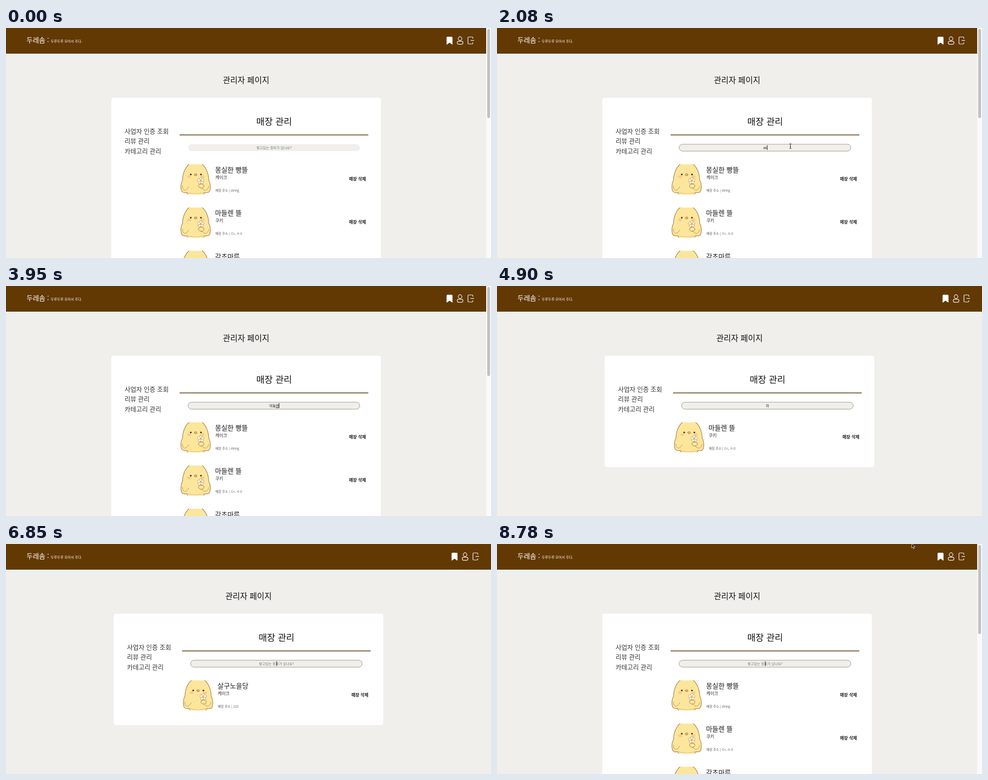
An HTML page that plays this animation: 1000 px wide and 475 px high, repeating every 8800 ms.

```html
<!DOCTYPE html>
<html lang="ko">
<head>
<meta charset="utf-8">
<title>관리자 페이지</title>
<style>
html, body { margin: 0; width: 100%; height: 100%; overflow: hidden; background: #f0efeb; }
svg { display: block; }
#stage { width: 100%; height: 100%; }
text { font-family: "Noto Sans CJK KR", "Noto Sans CJK", "Noto Sans", sans-serif; white-space: pre; }
</style>
</head>
<body>
<svg id="stage" viewBox="0 0 1000 475" xmlns="http://www.w3.org/2000/svg">
  <defs>
    <symbol id="chick" viewBox="0 0 62 62">
      <path d="M20-2C8 6 4 22 4 33C0 39 0 50 2 55C5 59 9 59 12 58L16 64H46L50 58C54 59 58 59 60 55C62 50 62 39 58 33C58 22 54 6 42-2Z" fill="#fce69c" stroke="#a0733f" stroke-width="1.1"/>
      <path d="M4 44C3 54 10 58 17 46M58 45C56 54 50 57 43 48" fill="none" stroke="#b5854a" stroke-width=".9"/>
      <path d="M13 58Q31 64 49 58" fill="none" stroke="#ecc978" stroke-width="1.5"/>
      <ellipse cx="17.5" cy="25.5" rx="4.4" ry="3" fill="#f9cd8c"/>
      <ellipse cx="45" cy="25.5" rx="4.4" ry="3" fill="#f9cd8c"/>
      <circle cx="21" cy="21" r="1.8" fill="#4a3425"/>
      <circle cx="42" cy="21" r="1.8" fill="#4a3425"/>
      <ellipse cx="31" cy="21.5" rx="2.9" ry="2.1" fill="#f4bd66" stroke="#8c6238" stroke-width=".8"/>
      <path d="M41 38L43 50" stroke="#8b8a4c" stroke-width="1.2"/>
      <g fill="#fffaf0" stroke="#b08346" stroke-width=".7" id="petals"></g>
      <circle cx="41.5" cy="34" r="2.2" fill="#f3b04a"/>
      <path d="M37 43Q43 38 48 43Q49 49 42 49Q36 48 37 43Z" fill="#fce69c" stroke="#a0733f" stroke-width=".9"/>
    </symbol>
  </defs>
  <rect width="1000" height="475" fill="#f0efeb"/>
  <rect width="1000" height="53" fill="#623903"/>
  <g id="brand"></g>
  <g id="icons" fill="none" stroke="#fff" stroke-width="1.2" stroke-linecap="round" stroke-linejoin="round">
    <path d="M909 20Q909 18.500 910.500 18.500H918.500Q920 18.500 920 20V33.500L914.500 29.500L909 33.500Z" fill="#fff"/>
    <circle cx="936.200" cy="22" r="3.800"/>
    <rect x="930.400" y="27.400" width="11.800" height="6.200" rx="3.100"/>
    <path d="M962.500 21.500V20Q962.500 18.500 961 18.500H954Q952.500 18.500 952.500 20V31.500Q952.500 33 954 33H961Q962.500 33 962.500 31.500V30M958.500 25.700H964.500"/>
  </g>
  <g id="page">
    <rect id="card" x="217" y="144" width="556" rx="5" fill="#fff"/>
    <g id="labels"></g>
    <rect x="358" y="219.800" width="389" height="2" fill="#7d5f3c"/>
    <rect id="box" x="375.500" y="240" width="354" height="14.300" rx="7.150" fill="#f0efec"/>
    <text id="field" x="552.700" y="249.500" font-size="7.100" text-anchor="middle"></text>
    <rect id="under" y="251.200" height=".8" fill="#333"/>
    <rect id="caret" y="242" width="1" height="10" fill="#111"/>
    <g id="all"></g>
    <g id="hit1"></g>
    <g id="hit2"></g>
  </g>
  <g id="bar">
    <rect x="990" width="10" height="475" fill="#fafafa"/>
    <rect x="992.200" y="2" width="5.800" height="184" rx="2.900" fill="#c1c1c1"/>
  </g>
  <path id="arrow" d="M0 0V9.200L2.200 7.300L3.700 10.500L5.200 9.800L3.800 6.800H6.600Z" fill="#111" stroke="#fff" stroke-width=".8"/>
  <path id="beam" d="M-2-5Q0-5 0-4Q0-5 2-5M0-4V4M-2 5Q0 5 0 4Q0 5 2 5M-1 1H1" fill="none" stroke="#222" stroke-width="1"/>
</svg>
<script>
const LOOP = 8800;
const $ = id => document.getElementById(id);
const show = (id, on) => $(id).setAttribute('visibility', on ? 'visible' : 'hidden');
const move = (id, x, y) => $(id).setAttribute('transform', `translate(${x} ${y})`);

// text placed by its left edge (or middle) and vertical centre
const label = (str, x, cy, size, weight = 400, fill = '#1c1c1c', anchor = 'start') =>
  `<text x="${x}" y="${cy + size * 0.38}" font-size="${size}" font-weight="${weight}" fill="${fill}" text-anchor="${anchor}">${str}</text>`;

const shop = (name, kind, address, row) => {
  const y = 281.5 + row * 89.3;
  return `<use href="#chick" x="360" y="${y}" width="62" height="62"/>` +
    label(name, 431, y + 11.3, 13.9, 500) +
    label(kind, 431.7, y + 27, 8.8, 500, '#2a2a2a') +
    label('매장 주소 | ' + address, 431.7, y + 53.8, 6.6, 400, '#555') +
    label('매장 삭제', 742.3, y + 30.3, 8.9, 700, '#222', 'end');
};

$('petals').innerHTML = [0, 1, 2, 3, 4].map(i => {
  const a = i * Math.PI * 0.4 - Math.PI / 2;
  return `<circle cx="${41.5 + 4 * Math.cos(a)}" cy="${34 + 4 * Math.sin(a)}" r="2.9"/>`;
}).join('');

$('brand').innerHTML =
  label('두레솜 :', 42.3, 25, 14, 400, '#fff') +
  label('두루두루 모아서 주다.', 92.3, 27.8, 7.1, 400, '#fff');

$('labels').innerHTML =
  label('관리자 페이지', 495, 108.2, 16.5, 500, '#111', 'middle') +
  label('매장 관리', 552.8, 193, 18.6, 400, '#111', 'middle') +
  ['사업자 인증 조회', '리뷰 관리', '카테고리 관리']
    .map((s, i) => label(s, 244.5, 213 + i * 20.3, 13, 500, '#333')).join('');

const cookie = ['마들렌 뜰', '쿠키', 'ㅁㄴㅇㄹ'];
$('all').innerHTML = shop('몽실한 빵뜰', '케이크', 'string', 0) +
  shop(...cookie, 1) + shop('감초마루', '케이크', 'string', 2);
$('hit1').innerHTML = shop(...cookie, 0);
$('hit2').innerHTML = shop('살구노을당', '케이크', '123', 0);

// [time, field value, last syllable still being composed]
const keys = [
  [0, ''], [1950, 'a'], [2080, 'ak'], [2580, 'a'], [2650, ''],
  [2790, 'ㅁ', 1], [2870, '마', 1], [3060, '맏', 1], [3130, '마드', 1], [3410, '마들', 1],
  [3690, '마들ㄹ', 1], [3890, '마들레', 1], [3950, '마들렌', 1],
  [4780, '마들'], [4900, '마'], [5050, ''],
  [5140, 'ㅅ', 1], [5410, '사', 1], [5480, '살', 1], [5560, '삵', 1], [5630, '살구', 1],
  [6740, '살'], [6850, '']
];
// caret on/off switches, starting hidden
const blinks = [1110, 1610, 1950, 4590, 4780, 4900, 5050, 6320, 6740, 7290, 7790, 8290, 8780];
const views = [[0, 'all'], [4090, 'hit1'], [5410, 'hit2'], [7170, 'all']];
const FOCUS = 1110;

const at = (list, t) => list.filter(k => k[0] <= t).pop();
const clamp = v => Math.max(0, Math.min(1, v));
const ease = v => v * v * (3 - 2 * v);

function drawField(t) {
  const [, value, composing] = at(keys, t);
  const field = $('field');
  const focused = t >= FOCUS;
  field.textContent = value || '찾고있는 정보가 있나요?';
  field.setAttribute('fill', value ? '#222' : '#777');
  $('box').setAttribute('stroke', focused ? '#a0968a' : 'none');

  const end = 552.7 + (value ? field.getComputedTextLength() / 2 : 0);
  $('caret').setAttribute('x', end);
  show('caret', blinks.filter(b => b <= t).length % 2);
  $('under').setAttribute('x', end - 6.5);
  $('under').setAttribute('width', 6.5);
  show('under', composing && t < 5820);
}

function drawPointer(t) {
  const enter = ease(clamp((t - 120) / 510));
  const leave = ease(clamp((t - 7950) / 400));
  const x = 640 - 35 * enter + 250 * leave;
  const y = 480 - 236 * enter - 245 * leave;
  const seen = (t >= 120 && t < 2790) || t >= 7950;
  const overField = y > 239 && y < 255;
  move('arrow', x, y);
  move('beam', x, y);
  show('arrow', seen && !overField);
  show('beam', seen && overField);
}

function draw(t) {
  const view = at(views, t)[1];
  const full = view === 'all';
  ['all', 'hit1', 'hit2'].forEach(id => show(id, id === view));
  show('bar', full);
  move('page', full ? 0 : 5, 0);
  move('icons', full ? 0 : 10.3, 0);
  $('card').setAttribute('height', full ? 400 : 230);
  drawField(t);
  drawPointer(t);
}

const start = performance.now();
function tick() {
  draw((performance.now() - start) % LOOP);
  requestAnimationFrame(tick);
}
tick();
</script>
</body>
</html>
```
